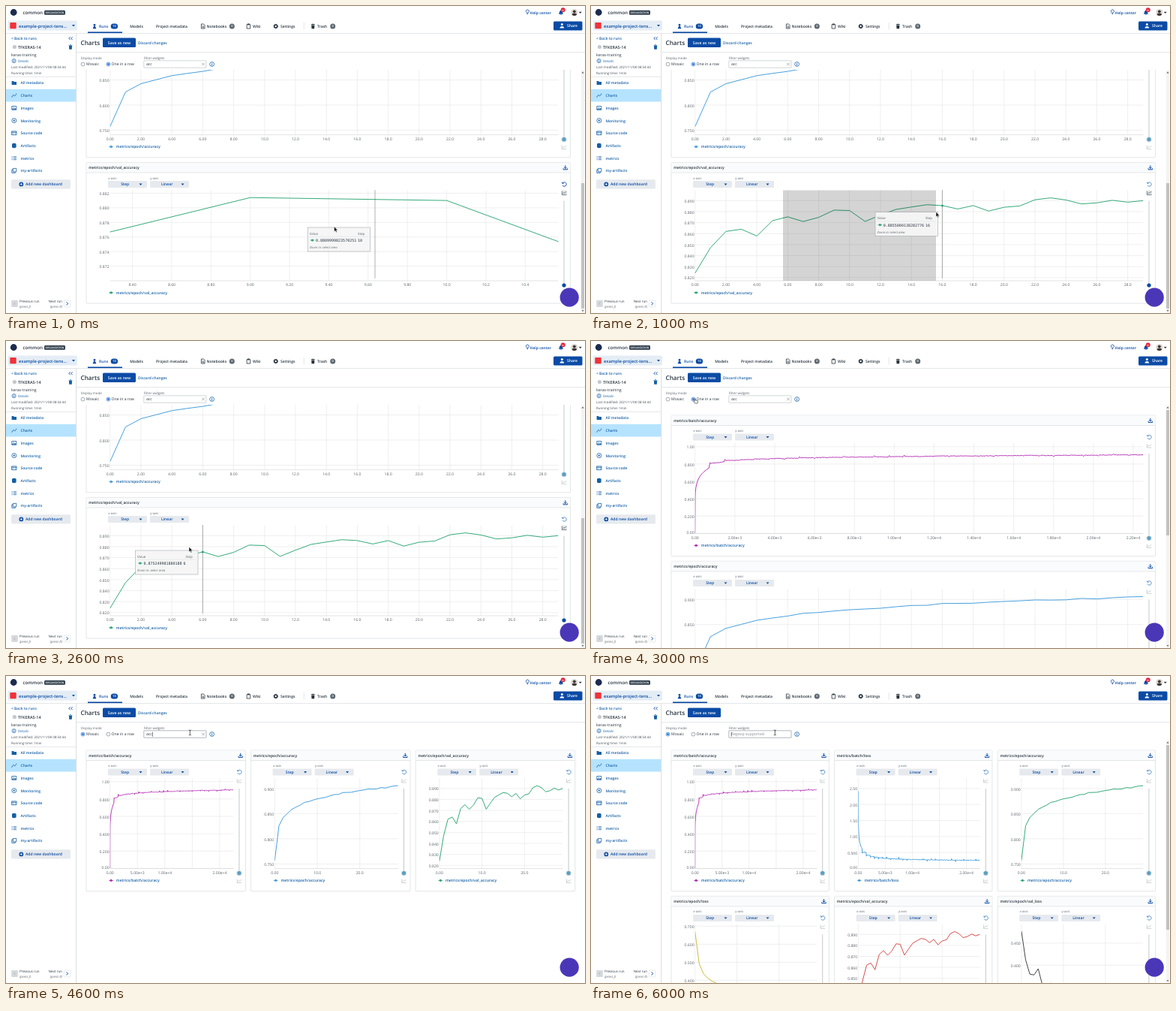
An HTML page for the animation above (7000 ms loop, 772 px wide and 409 px high).

```html
<!DOCTYPE html>
<html lang="en">
<head>
<meta charset="utf-8">
<title>Charts</title>
<style>
html, body { margin: 0; width: 100%; height: 100%; overflow: hidden; background: #fff; }
body > svg { display: block; width: 772px; height: 409px; }
text { font-family: "Open Sans", "Noto Sans", sans-serif; text-rendering: geometricPrecision; white-space: pre; }
.mono { font-family: "DejaVu Sans Mono", "Liberation Mono", monospace; }
.b { font-weight: 600; }
.i { font-style: italic; }
.m { text-anchor: middle; }
.e { text-anchor: end; }
.scene { visibility: hidden; }
.scene.on { visibility: visible; }
</style>
</head>
<body>
<script>
const BLUE = '#0b4ba5', LINK = '#155fa5', DARK = '#28343f', GREY = '#5c646c', LINE = '#d9dce0';
const PALETTE = ['#b32bb3', '#3f9bdc', '#2ba673', '#c6ba38', '#d64545', '#3a3a3a'];

// ---------- drawing helpers ----------
const text = (x, y, s, size = 5.1, fill = DARK, cls = '') =>
  `<text x="${x}" y="${y}" font-size="${size}" fill="${fill}" class="${cls}">${s}</text>`;
const rect = (x, y, w, h, fill, r = 0, stroke = 'none') =>
  `<rect x="${x}" y="${y}" width="${w}" height="${h}" rx="${r}" fill="${fill}" stroke="${stroke}" stroke-width=".6"/>`;
const circle = (x, y, r, fill, stroke = 'none', w = .7) =>
  `<circle cx="${x}" cy="${y}" r="${r}" fill="${fill}" stroke="${stroke}" stroke-width="${w}"/>`;
const line = (x1, y1, x2, y2, c = LINE, w = .7, dash = 'none') =>
  `<path d="M${x1} ${y1}L${x2} ${y2}" stroke="${c}" stroke-width="${w}" stroke-dasharray="${dash}"/>`;
const icon = (x, y, d, c = LINK, w = .8, fill = 'none') =>
  `<path transform="translate(${x} ${y})" d="${d}" fill="${fill}" stroke="${c}" stroke-width="${w}"/>`;
const solid = (x, y, d, c = LINK) => icon(x, y, d, 'none', 0, c);
const caret = (x, y, c = BLUE) => solid(x, y, 'M-2-1.1H2L0 1.3z', c);
const info = (x, y, r) => circle(x, y, r, 'none', LINK, .8) +
  line(x, y - r * .1, x, y + r * .6, LINK, .9) + circle(x, y - r * .45, .5, LINK);
const trash = (x, y, c) => solid(x, y, 'M-2.5-2.7H-1L-.7-3.3H.7L1-2.7H2.5V-2H-2.5zM-2.1-1.5H2.1L1.8 3.2H-1.8z', c);

// ---------- data ----------
let seed = 7;
const rnd = () => (seed = seed * 16807 % 2147483647) / 2147483647;

const ACC = [757, 826, 842.5, 850.5, 858.5, 863, 867, 872.5, 874, 877, 879.5, 881, 882.5, 885.5, 888,
  888.3, 892, 892.2, 892.5, 894.5, 896, 897.2, 899, 898.7, 899.2, 902, 901, 903.3, 905, 905.6].map(v => v / 1000);
const VAL_ACC = [824, 847.2, 862, 864, 857.8, 871.7, 875.25, 871, 874.8, 881.4, 881, 871.1, 876.8, 882, 884.2,
  886.3, 885.5, 882.4, 885.5, 880.5, 884, 885.1, 890.8, 892.5, 890.6, 887, 888, 890.3, 888.6, 890].map(v => v / 1000);
const VAL_LOSS = [.477, .412, .38, .378, .392, .355, .35, .36, .34, .32];
const LOSS = ACC.map((_, i) => i ? .25 + .24 / i ** .36 : .67);
const indexed = a => a.map((v, i) => [i, v]);

const EPOCH = 750, LAST = 22500;
const batch = value => {
  const pts = [];
  for (let s = 0; s <= LAST; s += s < 50 ? 10 : 50) {
    const e = Math.floor(s / EPOCH);
    const jitter = rnd() - .5 + (s % EPOCH < 50 ? (rnd() - .45) * 4 : 0);
    pts.push([s, value(e, s % EPOCH / EPOCH, jitter)]);
  }
  return pts;
};
const batchAcc = batch((e, f, j) => e ? ACC[Math.min(e, 29)] - (e < 2 ? .02 * (1 - f) : 0) + j * .006 : .76 * f ** .13);
const batchLoss = batch((e, f, j) => e ? .21 + .3 / e ** .55 + j * .022 : Math.min(2.42, .62 * (f + .001) ** -.28));

// The value `at` sits `pos` below the panel top; `unit` is pixels per 1.0.
const CHARTS = {
  bAcc: { name: 'batch/accuracy', pts: batchAcc, xr: [0, LAST], at: 1, pos: 41.8, unit: 115.5, tick: .2, ticks: 6 },
  bLoss: { name: 'batch/loss', pts: batchLoss, xr: [0, LAST], at: 2.5, pos: 50.8, unit: 42.7, tick: .5, ticks: 6 },
  acc: { name: 'epoch/accuracy', pts: indexed(ACC), xr: [0, 29], at: .9, pos: 50.9, unit: 670, tick: .05, ticks: 4 },
  loss: { name: 'epoch/loss', pts: indexed(LOSS), xr: [0, 29], at: .7, pos: 39.9, unit: 240, tick: .1, ticks: 5 },
  vAcc: { name: 'epoch/val_accuracy', pts: indexed(VAL_ACC), xr: [0, 29], at: .89, pos: 50.8, unit: 1465, tick: .01, ticks: 8 },
  vLoss: { name: 'epoch/val_loss', pts: indexed(VAL_LOSS), xr: [0, 29], at: .45, pos: 62.4, unit: 590, tick: .05, ticks: 3 },
};
const ZOOM = { ...CHARTS.vAcc, xr: [8.286, 10.568], at: .882, pos: 40.9, unit: 9725, tick: .002, ticks: 6 };

const label = v => v >= 1000 ? v.toExponential(2) : v > 1e-6 ? v.toPrecision(3) : '0.00';

// ---------- chart panel ----------
const PLOT_Y = 37, PLOT_H = 120.5;
const select = (x, y, title, value) =>
  text(x + .3, y - 2.5, title, 4.2, GREY) + rect(x, y, 52, 9, '#e6eaee', 1) +
  text(x + 22.7, y + 6.4, value, 5.1, BLUE, 'b m') + caret(x + 43.5, y + 4.6);
const chartIcon = (x, y, c) => icon(x, y, 'M-3-2.5V2.5H3M-2.4 1.5L-.6-.6.6.4 2.8-2', c, .7);

function panel(c, L, T, W, color, xStep, { hot = false, skip = -1, resetColor = '#4f8bc6' } = {}) {
  const R = L + W, px = L + 31.7, pw = W - 48, bottom = T + PLOT_Y + PLOT_H;
  const [x0, x1] = c.xr;
  const X = v => (v - x0) / (x1 - x0) * pw;
  const Y = v => c.pos + (c.at - v) * c.unit;
  let s = rect(L, T, W, 187.7, '#fff', 1, '#cfd3d7') + rect(L + .3, T + .3, W - .6, 13, '#fafbfc') +
    line(L, T + 13.5, R, T + 13.5) + text(L + 3.2, T + 8.9, 'metrics/' + c.name, 5.05, DARK, 'b') +
    icon(R - 6.8, T + 6.8, 'M0-3V1M-1.8-.7L0 1.2 1.8-.7M-2.7 1V2.6H2.7V1', BLUE, 1) +
    select(L + 29, T + 24.5, 'x-axis', 'Step') + select(L + 85, T + 24.5, 'y-axis', 'Linear') +
    icon(R - 8.2, T + 29, 'M-2.1-1.6A2.7 2.7 0 1 1-2.4 1.2M-2.7-3V-1.2H-.8', resetColor, .95);

  if (hot) s += rect(R - 12, T + 37.3, 7.4, 6.6, '#dfe3e6', 1);
  s += chartIcon(R - 8.3, T + 40.5, hot ? '#5c6b72' : '#b9bec3') +
    line(R - 8.6, T + 51, R - 8.6, T + 163, '#c3c7ca', 1) +
    (hot ? '' : circle(R - 8.6, T + 163.8, 3.6, '#cfdfe8')) +
    circle(R - 8.6, T + 163.6, 2.6, hot ? BLUE : '#5c9fc0') + chartIcon(R - 8.3, T + 174, '#b9bec3');

  for (let i = 0; i < c.ticks; i++) {
    const v = c.at - i * c.tick, y = T + Y(v);
    s += line(px, y, px + pw, y, '#e4e4e4', .6) +
      text(px - 1.1, Math.min(y + .7, T + 156) + 1.9, label(v), 5.1, GREY, 'e');
  }
  for (let i = Math.ceil(x0 / xStep - .01); i * xStep <= x1; i++) {
    const x = px + X(i * xStep);
    s += line(x, T + PLOT_Y, x, bottom, '#e4e4e4', .6);
    if (i !== skip) s += text(x, T + 164.6, label(i * xStep), 5.1, GREY, 'm');
  }
  s += line(px, bottom, px + pw, bottom, '#d2d2d2', .6);
  const d = c.pts.map(([x, y]) => X(x).toFixed(2) + ' ' + (Y(y) - PLOT_Y).toFixed(2)).join('L');
  s += `<svg x="${px}" y="${T + PLOT_Y}" width="${pw}" height="${PLOT_H}">` + icon(0, 0, 'M' + d, color, .95) + '</svg>';
  return s + line(L + 30.3, T + 173.4, L + 36, T + 173.4, color, .8) +
    solid(L + 33.1, T + 173.4, 'M-2.2 0L0-1.9 2.2 0 0 1.9z', color) +
    text(L + 39.8, T + 175.2, 'metrics/' + c.name, 5.1, LINK, 'b');
}

// ---------- page furniture ----------
function header() {
  const tab = (x, s, c = DARK) => text(x, 28.8, s, 5.05, c, 'b');
  const count = (x, n, w, c) => rect(x - w / 2, 23.4, w, 7, c, 3.5) + text(x, 28.4, n, 4, '#fff', 'b m');
  return circle(10.2, 8.5, 4.4, '#1d2b4f') + text(22.5, 10.8, 'common', 6.2, DARK, 'b') +
    rect(51, 5.7, 28, 6, '#33424f', 1.5) + text(65, 10.1, 'ORGANIZATION', 3.3, '#fff', 'b m') +
    icon(695.3, 8, 'M-.8 1.6V.8A2 2 0 1 1 .8 .8V1.6zM-.7 2.8H.7', BLUE, .8) +
    text(698.6, 10.5, 'Help center', 5.05, BLUE, 'b') +
    solid(740, 8.7, 'M-3 2C-2 1-2.4-3 0-3S2 1 3 2zM-1 2.5H1L0 3.5z', BLUE) +
    circle(742.7, 5.3, 3, '#e0263c') + text(742.7, 6.6, '9+', 3.2, '#fff', 'b m') +
    circle(757.8, 8.5, 4.6, '#ded8d2') + circle(757.8, 7.3, 1.9, '#3c3533') +
    solid(757.8, 8.5, 'M-3.2 3.2Q-3 1 0 1T3.2 3.2Q0 6-3.2 3.2z', '#3c3533') + caret(765.7, 8.8, DARK) +
    rect(2.5, 19.6, 92.5, 12.9, '#e4edf5', 1.5) + rect(5.3, 22, 8.4, 8.2, '#f03238', 1) +
    text(17, 28.8, 'example-project-tens...', 5.8, BLUE, 'b') + caret(90, 26.2) +
    solid(118, 27, 'M0-3.2A1.5 1.5 0 1 1 0-.2 1.5 1.5 0 1 1 0-3.2M-1-.1H1L2.4 3.2H-2.4z', BLUE) +
    tab(124, 'Runs', BLUE) + count(144.4, '10', 9.4, BLUE) + rect(109, 34.4, 46, 1.8, BLUE) +
    tab(165.2, 'Models') + tab(200, 'Project metadata') +
    icon(262.6, 27, 'M-2.2-3H1L2.4-1.5V3H-2.2zM-1 0H1.2M-1 1.4H1.2', DARK) + tab(267.6, 'Notebooks') + count(301.3, '0', 7, '#5d6770') +
    icon(323.4, 27, 'M-2.3-2.4H2.3V3H-2.3zM-1-3.2H1V-2H-1z', DARK) + tab(329, 'Wiki') +
    circle(359.7, 27, 1.9, 'none', DARK, 1.5) + circle(359.7, 27, 2.8, 'none', DARK, .9).replace('/>', ' stroke-dasharray="1.1 1.1"/>') +
    tab(366, 'Settings') + line(397.3, 22, 397.3, 31.5) + trash(409.3, 27, DARK) + tab(415, 'Trash') + count(435.7, '0', 7, '#5d6770') +
    rect(730, 20.4, 38.5, 12, BLUE, 1.5) + circle(741.3, 24.6, 1.5, '#fff') +
    solid(741.3, 27, 'M-2.8 2.5Q-2.8 0 0 0T2.8 2.5z', '#fff') + text(748, 28.4, 'Share', 5.1, '#fff', 'b') +
    line(0, 36.5, 772, 36.5);
}

function sidebar() {
  const items = [
    ['All metadata', 'M-3.2-2.5H-.8L0-1.6H3.2V2.6H-3.2z', 1],
    ['Charts', 'M-3 2L-1-.8.8.8 3-2M-3.4 2.2H-2.6M2.6-2.2H3.4'],
    ['Images', 'M-3-2.4H3V2.4H-3zM-2.4 1.8L-.6-.6.5.6 1.2 0 2.5 1.8z'],
    ['Monitoring', 'M-3 0A3 3 0 1 0 3 0 3 3 0 1 0-3 0M0-1.6V1.6M-1.4 0H1.4'],
    ['Source code', 'M-3.2-2.4H3.2V2.4H-3.2zM-3.2-1H3.2M-1.2 .1L-1.9 .8-1.2 1.5M1.2 .1L1.9 .8 1.2 1.5'],
    ['Artifacts', 'M-2.8-2.3Q0-4 2.8-2.3V2.3Q0 4-2.8 2.3z', 1],
    ['metrics', 'M-3.2-2H-2M-3.2 0H-2M-3.2 2H-2M-1-2H3.2M-1 0H3.2M-1 2H3.2'],
    ['my-artifacts', 'M-1.5-3H3V1.5H-1.5zM-1.5-1.5H-3V3H1.5V1.5'],
  ];
  return text(7, 45, '&lt; Back to runs', 4.95, LINK, 'b') + icon(86.2, 43.2, 'M-.5-2L-2.4 0-.5 2M2.4-2L.5 0 2.4 2', BLUE, .9) +
    circle(11.4, 54.5, 2.6, '#c5c8cb') + text(16, 56.5, 'TFKERAS-14', 5.45, DARK, 'b') + trash(86, 54.6, LINK) +
    text(7, 66.5, 'keras-training', 5.25) + info(10.6, 73.1, 2.5) + text(16, 74.8, 'Details', 4.45, LINK) +
    text(7, 83, 'Last modified: 2021/11/08 08:54:44', 4.45, '#454d55') + text(7, 90.6, 'Running time: 1min', 4.45, '#454d55') +
    line(0, 94.3, 93.5, 94.3) + rect(0, 110.8, 93.5, 16.7, '#b5e3ff') +
    items.map(([s, d, full], i) => {
      const y = 102.5 + i * 16.7;
      return icon(10.8, y, d, LINK, full ? 0 : .8, full ? LINK : 'none') + text(19.5, y + 1.9, s, 4.97, LINK, 'b');
    }).join('') +
    rect(7, 231.2, 79, 12.3, '#e6eaee', 1.5) + circle(20.3, 237.4, 2.9, BLUE) + icon(20.3, 237.4, 'M-1.6 0H1.6M0-1.6V1.6', '#fff', .8) +
    text(26, 239.2, 'Add new dashboard', 5.1, BLUE, 'b') +
    rect(7.2, 392, 8.6, 9, '#d6d9dc', 1) + icon(11.5, 396.5, 'M.8-1.6L-.8 0 .8 1.6', '#a5aab0') +
    text(18, 395.1, 'Previous run', 4.5) + text(18, 401.6, '(press J)', 4.4, GREY, 'i') +
    text(75, 395.1, 'Next run', 4.5, DARK, 'e') + text(75, 401.6, '(press K)', 4.4, GREY, 'i e') +
    rect(77.3, 392, 8.6, 9, '#fff', 1, LINE) + icon(81.6, 396.5, 'M-1-2L1 0-1 2', BLUE, 1) +
    line(93.7, 36.5, 93.7, 409, '#d9dce0', 1);
}

const toolbar = () => text(99.5, 52.1, 'Charts', 8.15, DARK, 'b') +
  rect(129, 42.4, 44, 12.5, BLUE, 1.5) + text(151, 50.6, 'Save as new', 5.2, '#fff', 'b m') + line(94, 61.6, 772, 61.6) +
  text(99.7, 71, 'Display mode', 4.42, GREY) + text(107, 79.4, 'Mosaic', 5.17) + text(140.5, 79.4, 'One in a row', 5.15) +
  text(183.8, 71, 'Filter widgets', 4.48, GREY) + info(274.6, 77.5, 2.9);

function controls(mosaic, value, focus) {
  const radio = (x, on) => circle(x, 77.6, 2.4, '#fff', on ? '#1668d8' : '#7d858c', .7) + (on ? circle(x, 77.6, 1.4, '#1668d8') : '');
  const caretX = [187.2, 190, 192.8, 195.4][value.length];
  return radio(102.5, mosaic) + radio(136.4, !mosaic) + rect(183.8, 72.8, 83.2, 9.4, '#fff', .5, focus ? '#7d8790' : '#b5bbc1') +
    (value ? text(187, 79.4, value, 5.17) + icon(263, 77.5, 'M-1.9-1.9L1.9 1.9M1.9-1.9L-1.9 1.9', '#7f878e', .6) +
      text(176, 50.6, 'Discard changes', 4.95, LINK, 'b')
      : text(187, 79.4, 'Regexp supported', 5.17, '#858c93')) +
    (focus ? line(caretX, 74.7, caretX, 80.7, '#222', .6) : '');
}

const scrollbar = (y, h) => rect(766.8, 85.5, 4.4, 323.5, '#f3f3f3') + rect(767, y, 4, h, '#c1c1c1') +
  solid(769, 88.6, 'M-1.5 .8H1.5L0-1z', '#555') + solid(769, 406, 'M-1.5-.8H1.5L0 1z', '#555');

const arrow = (x, y) => icon(x, y, 'M0 0V6.6L1.5 5.2 2.6 7.6 3.7 7.1 2.6 4.8H4.7z', '#fff', .4, '#111');
const hand = icon(139.8, 79.8, 'M-1.6-3Q-.9-3.6-.5-3V-.8L2-.3Q2.9 0 2.7 1L2.2 3.2H-1.2L-3 .6Q-2.8-.2-1.6 .5z', '#222', .6, '#fff');
const beam = icon(245.3, 75.4, 'M-1.5-3.4Q0-3.4 0-2.6 0-3.4 1.5-3.4M0-2.6V2.6M-1.5 3.4Q0 3.4 0 2.6 0 3.4 1.5 3.4', '#222', .7);

const crosshair = x => line(x, 245.5, x, 362.5, '#444', .7, '1.2 .8');
const tip = (x, y, value, step) => rect(x, y, 83.4, 32, 'rgba(246,246,246,.96)', 0, '#a5a8ab') +
  text(x + 2.5, y + 9.5, 'Value', 4.4, GREY) + text(x + 76, y + 9.5, 'Step', 4.4, GREY, 'e') + line(x + 2, y + 12.3, x + 81, y + 12.3, LINE, .5) +
  line(x + 3.6, y + 17, x + 9, y + 17, PALETTE[1 + 1], .8) + circle(x + 6.3, y + 17, 1.6, PALETTE[2]) +
  text(x + 10.8, y + 18.9, value, 5, DARK, 'mono') + text(x + 10.8 + 3.01 * value.length + 1.9, y + 19.1, step, 5, DARK, 'mono') +
  text(x + 2.5, y + 28.4, 'Zoom in: select area', 4.2, GREY, 'i');

// ---------- scenes ----------
const WIDE = 645.6;
const scrolled = (chart, step, overlay) => controls(false, 'acc', false) + body(
  panel(CHARTS.acc, 107, 14.1, WIDE, PALETTE[1], 2) +
  panel(chart, 107, 208.5, WIDE, PALETTE[2], step, { hot: true, resetColor: chart === ZOOM ? BLUE : '#4f8bc6' }) +
  scrollbar(236, 167) + overlay);
const body = s => `<svg y="85" width="772" height="324" viewBox="0 85 772 324">${s}</svg>`;
const mosaic = (keys, W, pitch) => keys.map((k, i) => panel(CHARTS[k], 107 + i % 3 * pitch, i < 3 ? 99 : 293.4, W,
  PALETTE[i], CHARTS[k].xr[1] === LAST ? 5000 : 10, { skip: CHARTS[k].xr[1] === LAST ? 3 : -1 })).join('');

const SCENES = [
  scrolled(ZOOM, .2, crosshair(492) + tip(402.2, 295, '0.8809999823570251', '10') + arrow(437.6, 294)),
  scrolled(CHARTS.vAcc, 2, rect(256, 245.5, 204, 120.5, 'rgba(0,0,0,.17)') + crosshair(468.4) + circle(468.4, 265.9, 1.5, PALETTE[2]) +
    tip(379, 274.6, '0.8855000138282776', '16') + arrow(460, 274.4)),
  scrolled(CHARTS.vAcc, 2, crosshair(262.3) + circle(262.3, 280.9, 1.5, PALETTE[2]) +
    tip(172.6, 279, '0.875249981880188', '6') + arrow(244, 274.4)),
  controls(false, 'acc', false) + body(panel(CHARTS.bAcc, 107, 99, WIDE, PALETTE[0], 2000) +
    panel(CHARTS.acc, 107, 293.4, WIDE, PALETTE[1], 2) + scrollbar(92, 167)) + hand,
  controls(true, 'acc', true) + body(mosaic(['bAcc', 'acc', 'vAcc'], 212.5, 219.6)) + beam,
  controls(true, 'ac', true) + body(mosaic(['bAcc', 'bLoss', 'acc', 'vAcc', 'vLoss'], 210.3, 217.6) + scrollbar(92, 246)) + beam,
  controls(true, '', true) + body(mosaic(['bAcc', 'bLoss', 'acc', 'loss', 'vAcc', 'vLoss'], 210.3, 217.6) + scrollbar(92, 246)) + beam,
];

document.body.innerHTML = '<svg viewBox="0 0 772 409" fill="none">' + rect(0, 0, 772, 409, '#fff') +
  header() + sidebar() + toolbar() +
  SCENES.map(s => `<g class="scene">${s}</g>`).join('') +
  circle(751.2, 388.2, 12.6, '#4a37b8') + '</svg>';

// ---------- playback ----------
const HOLD = 1000;
const groups = [...document.querySelectorAll('.scene')];
let shown = -1;
function tick() {
  const now = Math.floor(performance.now() / HOLD) % groups.length;
  if (now !== shown) {
    groups.forEach((g, i) => g.classList.toggle('on', i === now));
    shown = now;
  }
  requestAnimationFrame(tick);
}
tick();
</script>
</body>
</html>
```
